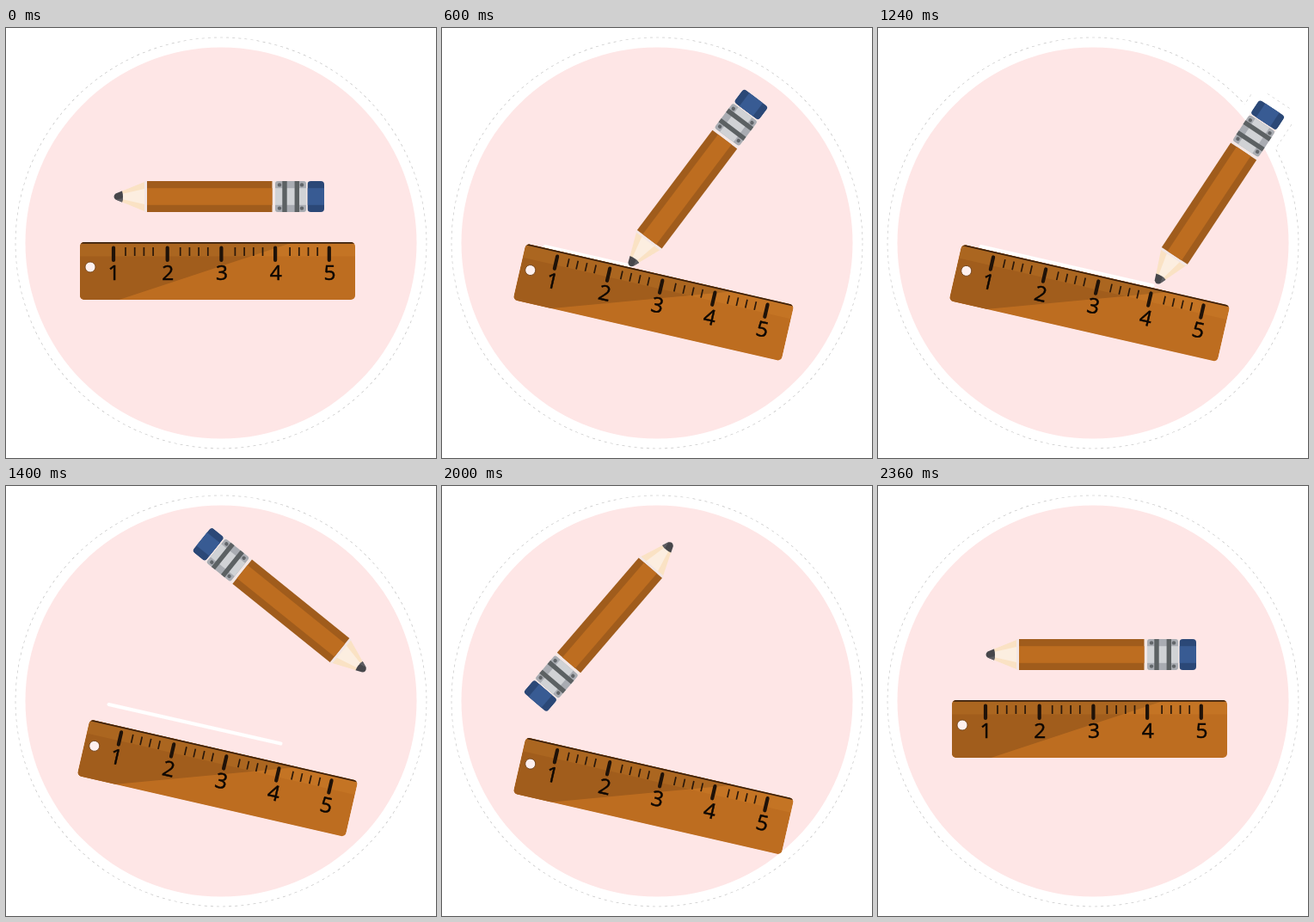
An HTML page for the animation above (3600 ms loop, 500 by 500 pixels).

```html
<!DOCTYPE html>
<html lang="en">
<head>
<meta charset="utf-8">
<title>Pencil and ruler</title>
<style>
  html, body { margin: 0; width: 100%; height: 100%; overflow: hidden; background: #fff; }
  svg { display: block; width: 100vw; height: 100vh; }
  text {
    font: 24.5px "Open Sans", "Noto Sans", sans-serif;
    text-anchor: middle; fill: #0d0703; stroke: #0d0703; stroke-width: .5;
  }
</style>
</head>
<body>
<svg viewBox="0 0 500 500">
  <defs>
    <clipPath id="rulerClip"><rect x="-160" y="-33.5" width="320" height="67" rx="5"/></clipPath>
    <clipPath id="eraserClip"><rect x="199" y="-18" width="19.5" height="36" rx="4"/></clipPath>
    <path id="outline" d="M-26 0 L12 -18 H218 V18 H12 Z"/>
  </defs>

  <!-- sticker border: dotted rim, white body, pink disc -->
  <g fill="none" stroke="#c4c4c4" stroke-dasharray="3 4">
    <circle cx="250" cy="250" r="235" stroke-width="8.6"/>
    <use class="pencil" href="#outline" stroke-width="23" stroke-linejoin="round"/>
  </g>
  <circle cx="250" cy="250" r="238.7" fill="#fff"/>
  <use class="pencil" href="#outline" fill="#fff" stroke="#fff" stroke-width="22" stroke-linejoin="round"/>
  <circle cx="250" cy="250" r="227.5" fill="#fee6e6"/>

  <path id="line" fill="none" stroke="#fff" stroke-width="4" stroke-linecap="round"/>

  <g id="ruler">
    <g clip-path="url(#rulerClip)">
      <rect x="-160" y="-34" width="320" height="68" fill="#bd6d20"/>
      <path d="M-160 -34 H90 L-116 34 H-160 Z" fill="#a15d1c"/>
      <rect x="-160" y="-34" width="320" height="17" fill="#ffb040" opacity=".11"/>
      <path d="M-160 -33 H160" stroke="#3a200c" stroke-width="2.4"/>
    </g>
    <circle cx="-148" cy="-4.5" r="6" fill="#fef0ee" stroke="#6b3d14" stroke-width=".8"/>
    <path id="major" stroke="#1f1208" stroke-width="4.2" stroke-linecap="round"/>
    <path id="minor" stroke="#2a180a" stroke-width="1.7"/>
    <g id="digits"></g>
  </g>

  <g class="pencil">
    <path d="M12 -18 L-17 -6.3 V6.3 L12 18 Z" fill="#fae2c4"/>
    <path d="M-17 -3 L12 -9.5 V9.5 L-17 3 Z" fill="#fceee0"/>
    <path d="M-24 -3.6 L-16.5 -6.6 Q-14.5 0 -16.5 6.6 L-24 3.6 Q-28 0 -24 -3.6 Z" fill="#47474b"/>
    <path d="M-24 3.6 L-16.5 6.6 Q-15.4 3 -15.5 2 Z" fill="#5e5e62"/>
    <rect x="9.5" y="-18" width="190" height="36" fill="#f3e7e5"/>
    <rect x="12.5" y="-18" width="145.5" height="36" fill="#a05c1c"/>
    <rect x="12.5" y="-9.8" width="145.5" height="19.6" fill="#bd6d20"/>
    <rect x="161.5" y="-18" width="36" height="36" rx="3" fill="#a9acb2"/>
    <rect x="161.5" y="-9.8" width="36" height="19.6" fill="#d0d2d5"/>
    <path d="M172.5 -18 V18 M186.8 -18 V18" stroke="#5c6163" stroke-width="5.4"/>
    <g id="rivets" fill="#62666a"></g>
    <g clip-path="url(#eraserClip)">
      <rect x="199" y="-18" width="20" height="36" fill="#2b4877"/>
      <rect x="199" y="-9.8" width="20" height="19.6" fill="#385b93"/>
    </g>
  </g>
</svg>
<script>
const LOOP = 3600, STEP = 40;
const $ = id => document.getElementById(id);
const pencils = document.querySelectorAll(".pencil");

let major = "", minor = "", digits = "";
for (let i = 0; i < 5; i++) {
  const x = -121 + i * 62.7;
  major += `M${x} -27 V-12.5`;
  digits += `<text x="${x + .6}" y="10.8">${i + 1}</text>`;
  for (let k = 0; k < 4 && i < 4; k++) minor += `M${-107 + i * 63.7 + k * 10.7} -27.5 V-17.5`;
}
$("major").setAttribute("d", major);
$("minor").setAttribute("d", minor);
$("digits").innerHTML = digits;
$("rivets").innerHTML = [166.5, 192.5].map(x =>
  [-13.6, 13.6].map(y => `<circle cx="${x}" cy="${y}" r="2.2"/>`).join("")).join("");

const linear = p => p;
const smooth = p => p < .5 ? 2 * p * p : 1 - 2 * (1 - p) ** 2;
const clamp = p => Math.min(1, Math.max(0, p));

// Keys: [time, [x, y, angle], easing towards this key]
const pencilKeys = [
  [0, [151.5, 196, 0]],
  [400, [132, 233, -53], smooth],
  [800, [335.5, 278.5, -53], linear],
  [1200, [335.5, 278.5, -53], linear],
  [1600, [460, 119, -229.3], smooth],
  [2000, [250.5, 85.8, -229.3], smooth],
  [2360, [151.5, 196, 0], smooth]
];
const rulerKeys = [
  [0, [246, 282.5, 0]],
  [400, [246, 319, 12.9], smooth],
  [1200, [246, 319, 12.9], linear],
  [1600, [246, 360.5, 12.9], smooth],
  [2000, [246, 360.5, 12.9], linear],
  [2360, [246, 282.5, 0], smooth]
];

function pose(keys, t) {
  const i = keys.findIndex(k => k[0] > t);
  if (i < 0) return keys[keys.length - 1][1];
  const [t0, a] = keys[i - 1], [t1, b, ease] = keys[i];
  const p = ease((t - t0) / (t1 - t0));
  return a.map((v, n) => v + (b[n] - v) * p);
}

function place(el, [x, y, angle]) {
  el.setAttribute("transform", `translate(${x} ${y}) rotate(${angle})`);
}

function render(t) {
  const p = pose(pencilKeys, t);
  pencils.forEach(el => place(el, p));
  place($("ruler"), pose(rulerKeys, t));
  const shown = clamp((t - 400) / 400) - clamp((t - 1600) / 350);
  $("line").setAttribute("d", shown > 0 ? `M119.5 254 l${200 * shown} ${45.5 * shown}` : "");
}

const start = performance.now();
function tick() {
  const t = (performance.now() - start) % LOOP;
  render(Math.floor(t / STEP) * STEP);
  requestAnimationFrame(tick);
}
tick();
</script>
</body>
</html>
```
